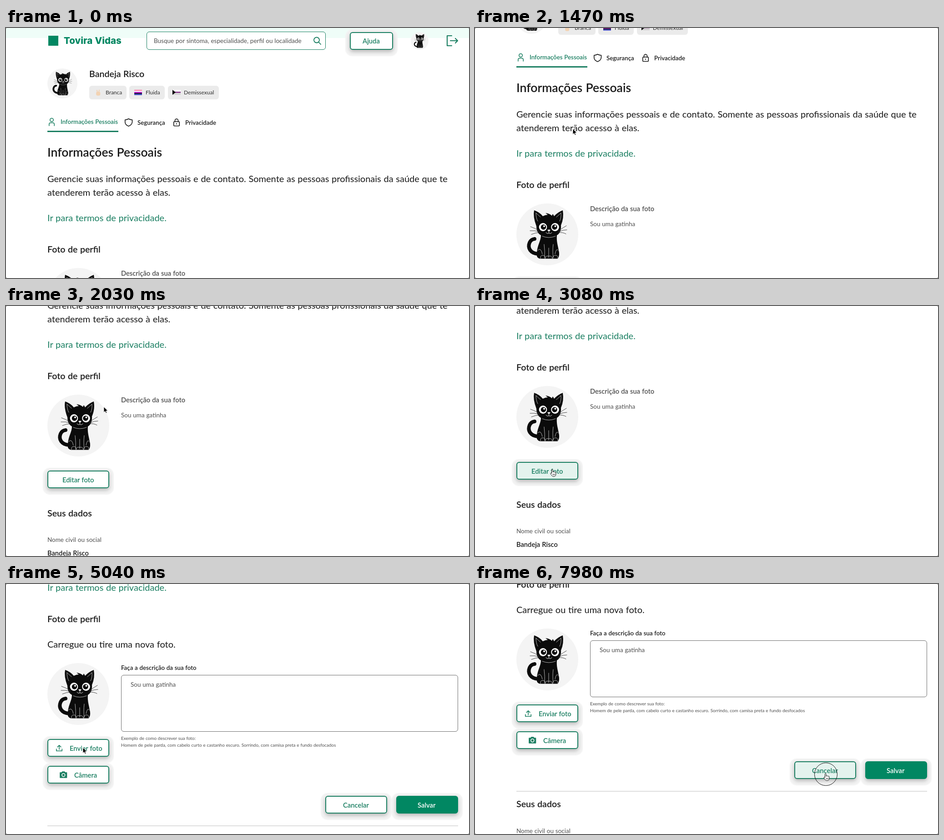
These frames come from a looping animation (1018 by 550 pixels, 8000 ms). An HTML page:

```html
<!DOCTYPE html>
<html lang="pt-BR">
<head>
<meta charset="utf-8">
<title>Perfil</title>
<style>
  :root { --green: #018762; --teal: #1b7f62; --ink: #1a1a1a; --soft: #4f4f4f; }
  html, body { margin: 0; width: 100%; height: 100%; overflow: hidden; background: #777; }
  #stage { position: relative; width: 1018px; height: 550px; overflow: hidden; background: #fff; border-radius: 3px; }
  #stage * { box-sizing: border-box; }
  #page, #stage div, #stage p, #stage svg { position: absolute; }
  #page { left: 0; top: 0; width: 1018px; height: 1100px; }
  p { margin: 0; white-space: nowrap; color: var(--ink); font: 20px/30px Lato, "Open Sans", sans-serif; word-spacing: .03em; }
  svg { overflow: visible; fill: none; stroke-linecap: round; stroke-linejoin: round; }
  p.h2 { font-size: 26.6px; font-weight: 600; }
  p.h3 { font-size: 19.6px; font-weight: 600; }
  p.link, p.tab.on { color: var(--teal); }
  p.tab, p.label { font-size: 13.3px; font-weight: 600; }
  p.caption { font-size: 14.7px; font-weight: 600; color: var(--soft); }
  p.small { font-size: 13.5px; color: var(--soft); }
  p.value { font-size: 14.7px; font-weight: 600; }
  p.tiny { font-size: 9.95px; color: var(--soft); }
  p.chip { font-size: 12px; color: #2d2d2d; }
  p.brand { font: 800 20.5px/30px Inter, sans-serif; color: var(--green); }
  p.action { font-size: 14.8px; font-weight: 600; color: var(--teal); }
  .button { height: 39px; border: 2px solid var(--teal); border-radius: 6px; background: #fff; box-shadow: 0 4px 9px rgba(0, 0, 0, .25), 0 4px 2px 10px #f3f3f3; }
  .button.hover { background: #e4f3ee; }
  .button.solid { background: var(--green); border-color: var(--green); }
  .button.solid + p { color: #fff; }
  .tag { top: 127px; height: 30px; border-radius: 6px; background: #ebebeb; }
  .band { left: 0; top: 0; width: 1018px; height: 22px; background: #effdf8; }
  .search { left: 309px; top: 8px; width: 394px; height: 40px; border: 1px solid var(--teal); border-radius: 6px; background: #fff; }
  #field { left: 253px; top: 610px; width: 741px; height: 125px; border: 1px solid; border-radius: 6px; }
  .rule { left: 91px; top: 941px; width: 903px; height: 2px; background: #dedede; }
  .underline { left: 91px; top: 226px; width: 156px; height: 3px; background: var(--teal); }
  .mark { left: 93px; top: 17px; width: 22px; height: 22px; background: var(--green); }
  #ring { width: 0; height: 0; border: 1.6px solid #111; border-radius: 50%; }
</style>
</head>
<body>
<div id="stage">
  <svg width="0" height="0">
    <symbol id="cat" viewBox="0 0 136 136">
      <circle cx="68" cy="68" r="68" fill="#f4f4f4"/>
      <path d="M48 111C31 110 24 98 29 86Q32 79 40 78" stroke="#0b0b0b" stroke-width="8"/>
      <path d="M54 70C54 82 46 92 45 108Q43 120 52 121.5L91 121.5Q96 114 93 103C91 91 88 84 89 70Z" fill="#0b0b0b"/>
      <path d="M44 50Q36 29 39 15Q51 19 58 28Q64 25 69 25L64 21Q73 22 78 27L80 23Q82 26 83 28Q91 19 102 15Q105 32 98 48Q99 66 87 71Q71 77 56 71Q44 66 44 50Z" fill="#0b0b0b"/>
      <g stroke="#ddd" stroke-width=".8">
        <path d="M43 21Q43 32 47 39M43 21L53 30M98 21Q99 32 95 39M98 21L88 30"/>
        <path d="M57 72Q71 78 86 72M61 90Q63 106 62 119M71 98V119M81 90Q79 106 81 119M47 103Q54 96 57 111M92 103Q88 97 85 111"/>
        <path d="M53 121Q52 114 58 114T63 121M80 121Q80 114 86 114T91 121M63 121Q64 114 71 116Q78 114 79 121"/>
      </g>
      <g fill="#fff">
        <ellipse cx="58.5" cy="52" rx="8.8" ry="9"/><ellipse cx="85" cy="52" rx="8.8" ry="9"/>
        <path d="M68 58.5Q71.5 56.5 75 58.5L71.5 62Z"/>
      </g>
      <g fill="#0b0b0b"><circle cx="59.5" cy="52" r="5.8"/><circle cx="84" cy="52" r="5.8"/></g>
      <g fill="#fff"><circle cx="61" cy="50" r="2"/><circle cx="85.5" cy="50" r="2"/></g>
      <path d="M71.5 62V65M65 64Q69 68 71.5 65Q74 68 78 64" stroke="#fff" stroke-width=".9"/>
      <path d="M50 60Q40 54 31 51M50 62Q40 59 30 60M51 64Q42 64 33 68M93 60Q103 53 110 49M93 62Q103 58 111 58M92 64Q102 63 109 67" stroke="#333" stroke-width=".9"/>
    </symbol>
  </svg>
  <div id="page"></div>
  <div id="ring"></div>
  <svg id="cursor" width="1" height="1">
    <path id="arrow" d="M0 0V12.2L2.9 9.6L4.8 13.8L6.8 12.9L5 8.8H8.8Z" fill="#000" stroke="#fff" stroke-width=".9"/>
    <g id="hand" stroke="#111">
      <path d="M-1.5 8V.8a1.3 1.3 0 0 1 2.6 0V5.5c0-1.4 2.3-1.4 2.4 0 .2-1.1 2.2-1 2.3.3 .3-.9 2-.6 2 .6V10c0 3-1.5 5-4 5H1.6C0 15-1.2 13-3.8 9.3-4.8 8-3.2 6.6-1.5 8Z" fill="#fff"/>
      <path d="M1.2 9.5V12M3.2 9.5V12M5.2 9.5V12" stroke-width=".8"/>
    </g>
    <path id="beam" d="M-2.5-7.5Q0-7.5 0-5.5Q0-7.5 2.5-7.5M0-5.5V5.5M-2.5 7.5Q0 7.5 0 5.5Q0 7.5 2.5 7.5" stroke="#222"/>
  </svg>
</div>
<script>
const $ = id => document.getElementById(id);
const TEAL = '#1b7f62', STEP = 70, LOOP = 8000;

const text = (x, y, kind, words) =>
  `<p class="${kind}" style="left:${x}px;top:${y - 15}px">${words}</p>`;
const icon = (x, y, body, color = TEAL, width = 1.6) =>
  `<svg width="1" height="1" style="left:${x}px;top:${y}px" stroke="${color}" stroke-width="${width}">${body}</svg>`;
const button = (id, x, y, w, labelX, label, kind = '') =>
  `<div id="${id}" class="button ${kind}" style="left:${x}px;top:${y}px;width:${w}px"></div>` +
  text(labelX, y + 19.5, 'action', label);
const cat = (x, y, size) =>
  `<svg width="${size}" height="${size}" style="left:${x}px;top:${y}px"><use href="#cat"/></svg>`;
const tag = (x, w, labelX, label) =>
  `<div class="tag" style="left:${x}px;width:${w}px"></div>` + text(labelX, 142, 'chip', label);
const stripes = (x, y, w, h, colors) => icon(x, y, colors.map((c, i) =>
  `<rect y="${i * h}" width="${w}" height="${h}" fill="${c}"/>`).join(''), 'none');
const personalData = y =>
  text(91, y, 'h3', 'Seus dados') +
  text(91, y + 58.5, 'small', 'Nome civil ou social') +
  text(91, y + 87, 'value', 'Bandeja Risco');

const header =
  '<div class="band"></div><div class="mark"></div>' + text(127, 28, 'brand', 'Tovira Vidas') +
  '<div class="search"></div>' +
  text(325, 28, 'small', 'Busque por sintoma, especialidade, perfil ou localidade') +
  icon(676, 20, '<circle cx="7" cy="6.5" r="6"/><path d="M11.5 11L16 16"/>', TEAL, 1.8) +
  button('help', 756, 8.5, 95, 784, 'Ajuda') + cat(890, 8.5, 39) +
  icon(970, 16, '<path d="M10 1H0V23H10M7 12H23M18 7L23 12L18 17"/>', TEAL, 2.2);

const profile =
  cat(91, 89, 66) + text(183, 101, 'h3', 'Bandeja Risco') +
  tag(183, 82, 219, 'Branca') + tag(271, 78, 307, 'Fluida') + tag(356, 112, 391, 'Demissexual') +
  icon(197, 135, '<path d="M4 7L3 2M7 7L8 1.5" stroke-width="2"/><rect x="2" y="6" width="7.5" height="7" rx="2.5" fill="#f3d3b3"/>', '#f3d3b3') +
  stripes(282, 136, 17, 2.3, ['#ff76a4', '#fff', '#c011d7', '#1b1030', '#2f3cbe']) +
  stripes(366, 136, 18, 2.2, ['#fff', '#fff', '#6e0071', '#d2d2d2', '#d2d2d2']) +
  icon(366, 136, '<path d="M0 0L7 5.5L0 11Z" fill="#000"/>', 'none') +
  icon(94, 198, '<circle cx="6.5" cy="4.2" r="3.7"/><path d="M.8 17V14Q.8 10.5 4 10.5H9Q12.2 10.5 12.2 14V17"/>') +
  text(120, 206, 'tab on', 'Informações Pessoais') + '<div class="underline"></div>' +
  icon(261, 199, '<path d="M8.5 .8Q12 3 16.5 3V8Q16 14 8.5 17Q1 14 .8 8V3Q5 3 8.5 .8Z"/>', '#111') +
  text(289, 208, 'tab', 'Segurança') +
  icon(368, 199, '<rect x=".8" y="7" width="12.5" height="9.5" rx="1.5"/><path d="M3.5 7V4.5a3.5 3.5 0 0 1 7 0V7M7 11V12.5"/>', '#111') +
  text(394, 208, 'tab', 'Privacidade');

const intro =
  text(91, 273, 'h2', 'Informações Pessoais') +
  text(91, 331, '', 'Gerencie suas informações pessoais e de contato. Somente as pessoas profissionais da saúde que te') +
  text(91, 361, '', 'atenderem terão acesso à elas.') +
  text(91, 417, 'link', 'Ir para termos de privacidade.') +
  text(91, 487, 'h3', 'Foto de perfil');

const viewing =
  cat(90.5, 527.5, 136) +
  text(253, 538.5, 'caption', 'Descrição da sua foto') +
  text(253, 572.5, 'small', 'Sou uma gatinha') +
  button('edit', 91, 695, 136, 124, 'Editar foto') + personalData(788.5);

const editing =
  text(91, 542, '', 'Carregue ou tire uma nova foto.') + cat(90.5, 584, 136) +
  text(253, 593.5, 'label', 'Faça a descrição da sua foto') +
  '<div id="field"></div>' + text(274, 630.5, 'small', 'Sou uma gatinha') +
  text(253, 749, 'tiny', 'Exemplo de como descrever sua foto:') +
  text(253, 764, 'tiny', 'Homem de pele parda, com cabelo curto e castanho escuro. Sorrindo, com camisa preta e fundo desfocados') +
  button('send', 91, 751, 136, 140, 'Enviar foto') +
  icon(110, 764, '<path d="M.8 9V13.2H13.2V9M7 10V1M3.2 4.6L7 .8L10.8 4.6"/>') +
  button('camera', 91, 810, 136, 150, 'Câmera') +
  icon(118, 822, `<path d="M1 3H4.5L6 1H10.5L12 3H15.5V14H1Z" fill="${TEAL}"/><circle cx="8.3" cy="8.2" r="3.4" stroke="#fff"/>`) +
  button('cancel', 701.5, 876, 136, 741, 'Cancelar') +
  button('save', 857.5, 876, 136, 905, 'Salvar', 'solid') +
  '<div class="rule"></div>' + personalData(970);

$('page').innerHTML = header + profile + intro +
  `<div id="viewing" style="left:0;top:0">${viewing}</div><div id="editing" style="left:0;top:0">${editing}</div>`;

// Rows: time, x, y
const pointerPath = [
  [350, 354, 424], [420, 300, 320], [490, 267, 249], [560, 267, 249], [630, 243, 235], [770, 215, 222],
  [2380, 215, 222], [2730, 204, 343], [3080, 170, 360], [3920, 170, 360], [4130, 169, 360], [5390, 169, 360],
  [5880, 264, 279], [6160, 421, 254], [6370, 418, 222], [6720, 418, 222], [7140, 490, 376],
  [7280, 490, 376], [7420, 540, 364], [7560, 660, 374], [7700, 771, 417.5]
];
const pointerShapes = [
  [0, ''], [350, 'arrow'], [2870, 'hand'], [4060, 'arrow'], [5390, 'hand'], [5600, 'arrow'],
  [6230, 'beam'], [6860, 'arrow'], [7630, 'hand']
];
const fieldTone = [[6440, 110], [6650, 20], [6720, 20], [6930, 110]];
const clicks = [3920, 7840];
const EDIT_AT = 4060;

const between = (t, from, to) => t >= from && t < to;
const latest = (rows, t) => rows.filter(r => r[0] <= t).pop()[1];

function tween(rows, t) {
  const next = rows.findIndex(r => r[0] > t);
  if (next < 1) return rows.at(next).slice(1);
  const [a, b] = [rows[next - 1], rows[next]];
  const k = (t - a[0]) / (b[0] - a[0]);
  return a.slice(1).map((v, i) => v + (b[i + 1] - v) * k);
}

function scrollAt(t) {
  if (t < 1050) return 0;
  if (t < 1470) return 142 * ((t - 1050) / 420) ** 2;
  if (t < 2730) return 352 - 210 * Math.exp((1470 - t) / 234);
  const k = Math.min(1, Math.max(0, (t - 4970) / 280));
  return 352 + 134 * (1 - (1 - k) ** 1.95);
}

function draw(t) {
  $('page').style.transform = `translateY(${-Math.round(scrollAt(t))}px)`;
  $('viewing').style.display = t < EDIT_AT ? '' : 'none';
  $('editing').style.display = t < EDIT_AT ? 'none' : '';
  $('edit').classList.toggle('hover', between(t, 2800, EDIT_AT));
  $('camera').classList.toggle('hover', between(t, 5390, 5600));
  $('cancel').classList.toggle('hover', t >= 7630);
  const tone = tween(fieldTone, t)[0];
  $('field').style.borderColor = `rgb(${tone},${tone},${tone})`;

  const [x, y] = tween(pointerPath, t);
  const shape = latest(pointerShapes, t);
  $('cursor').style.transform = `translate(${x}px,${y}px)`;
  for (const id of ['arrow', 'hand', 'beam']) $(id).style.display = id === shape ? '' : 'none';

  const click = clicks.find(c => between(t, c, c + 3 * STEP));
  const ring = $('ring').style;
  ring.display = click === undefined ? 'none' : '';
  if (click !== undefined) {
    const r = 12.5 + 6.5 * (t - click) / STEP;
    ring.width = ring.height = 2 * r + 'px';
    ring.left = x + .5 - r + 'px';
    ring.top = y + .5 - r + 'px';
  }
}

function frame() {
  const t = performance.now() % LOOP;
  draw(Math.floor(t / STEP) * STEP);
  requestAnimationFrame(frame);
}
frame();
</script>
</body>
</html>
```
